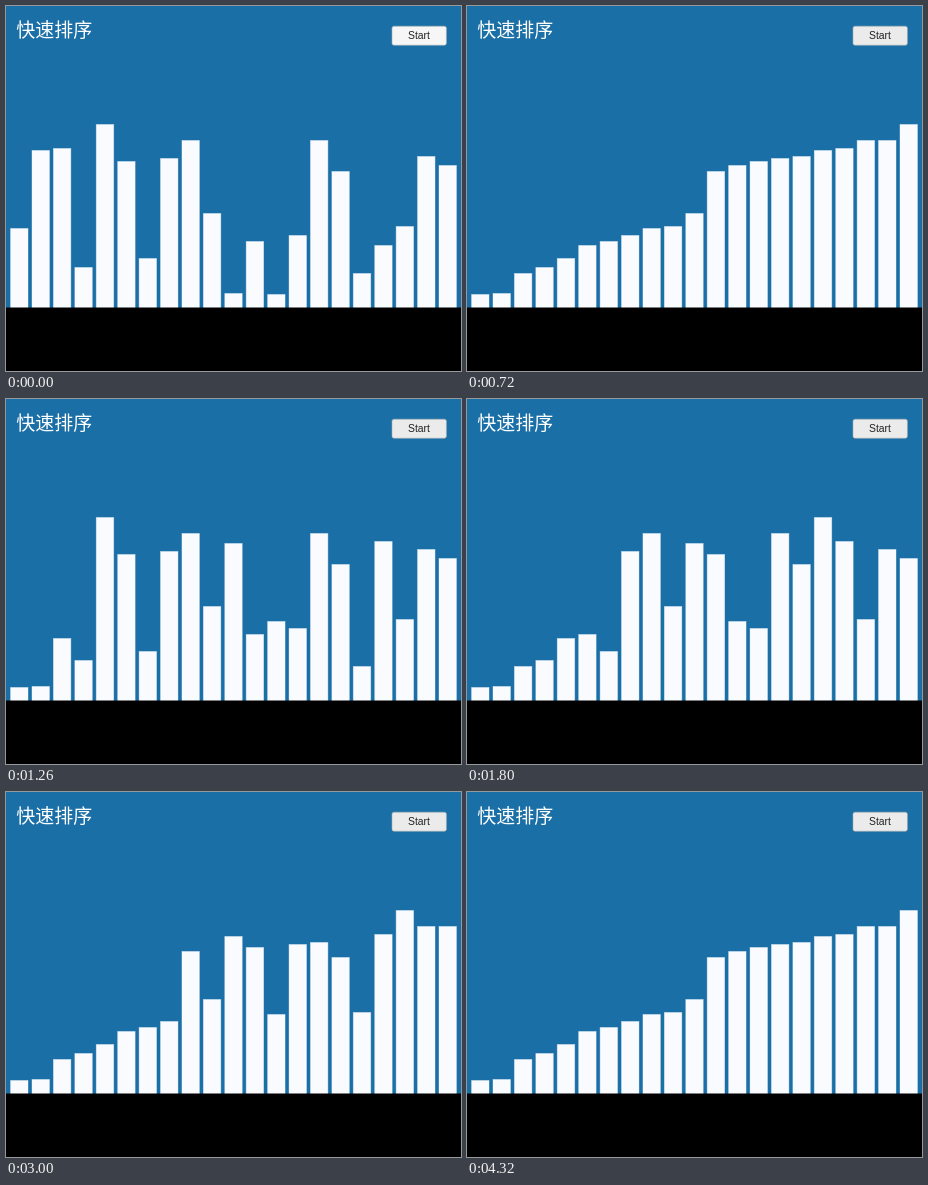
An HTML page for the animation above (6360 ms loop, 455 by 365 pixels).

```html
<!DOCTYPE html>
<html lang="zh-CN">
<head>
<meta charset="utf-8">
<style>
  html, body { margin: 0; width: 100%; height: 100%; overflow: hidden; background: #000; }
  svg { display: block; }
  .title { font: 500 19px "Noto Sans CJK SC", "Noto Sans CJK JP", "Noto Sans CJK", sans-serif; fill: #fff; }
  .label { font: 10.4px "Liberation Sans", Arial, sans-serif; fill: #222; text-anchor: middle; }
  /* The faint outline softens the edges of the bars. */
  #bars { fill: #f9fbfe; stroke: #f9fbfe; stroke-width: .8; stroke-opacity: .5; }
</style>
</head>
<body>
<svg width="455" height="365" viewBox="0 0 455 365">
  <rect width="455" height="302" fill="#1a6fa7"/>
  <text class="title" x="10.2" y="31">快速排序</text>
  <rect id="button" x="386" y="20.2" width="54.4" height="19" rx="2" stroke="#a8adb0" stroke-width=".6"/>
  <text class="label" x="413" y="33.4">Start</text>
  <g id="bars"></g>
  <rect y="301.5" width="455" height="63.5"/>
</svg>
<script>
const LOOP = 6360, PRESS = 540, SORTED = 720, REPLAY = 900;
const TICK = 60, FIRST_STEP = 892, STEP = 193;
const FLOOR = 302, PITCH = 21.42;
const heights = [79, 157, 159, 40, 183, 146, 49, 149, 167, 94, 14, 66, 13, 72, 167, 136, 34, 62, 81, 151, 142];

// Quicksort around the middle element; keeps a copy of the list after every exchange.
function quicksort(list, states, lo = 0, hi = list.length - 1) {
  if (lo >= hi) return states;
  const pivot = list[(lo + hi) >> 1];
  let i = lo, j = hi;
  while (i <= j) {
    while (list[i] < pivot) i++;
    while (list[j] > pivot) j--;
    if (i > j) break;
    if (i < j) {
      [list[i], list[j]] = [list[j], list[i]];
      states.push([...list]);
    }
    i++;
    j--;
  }
  quicksort(list, states, lo, j);
  return quicksort(list, states, i, hi);
}

const states = quicksort([...heights], [heights]);
const sorted = states[states.length - 1];

const button = document.getElementById("button");
const group = document.getElementById("bars");
const bars = heights.map((_, i) => {
  const bar = document.createElementNS("http://www.w3.org/2000/svg", "rect");
  bar.setAttribute("x", 4.6 + PITCH * i);
  bar.setAttribute("width", 17.4);
  return group.appendChild(bar);
});

const stepTime = k => Math.floor((FIRST_STEP + STEP * k) / TICK) * TICK;

function stateAt(t) {
  if (t < SORTED) return heights;
  // The finished order flashes up before the steps are replayed.
  if (t < REPLAY) return sorted;
  let step = 1;
  while (step < states.length - 1 && t >= stepTime(step)) step++;
  return states[step];
}

function draw(now) {
  const t = now % LOOP;
  button.setAttribute("fill", t < PRESS ? "#f6f6f6" : "#ebebeb");
  stateAt(t).forEach((height, i) => {
    bars[i].setAttribute("y", FLOOR - .5 - height);
    bars[i].setAttribute("height", height + .5);
  });
}

const start = performance.now();
function tick() {
  draw(performance.now() - start);
  requestAnimationFrame(tick);
}
tick();
</script>
</body>
</html>
```
